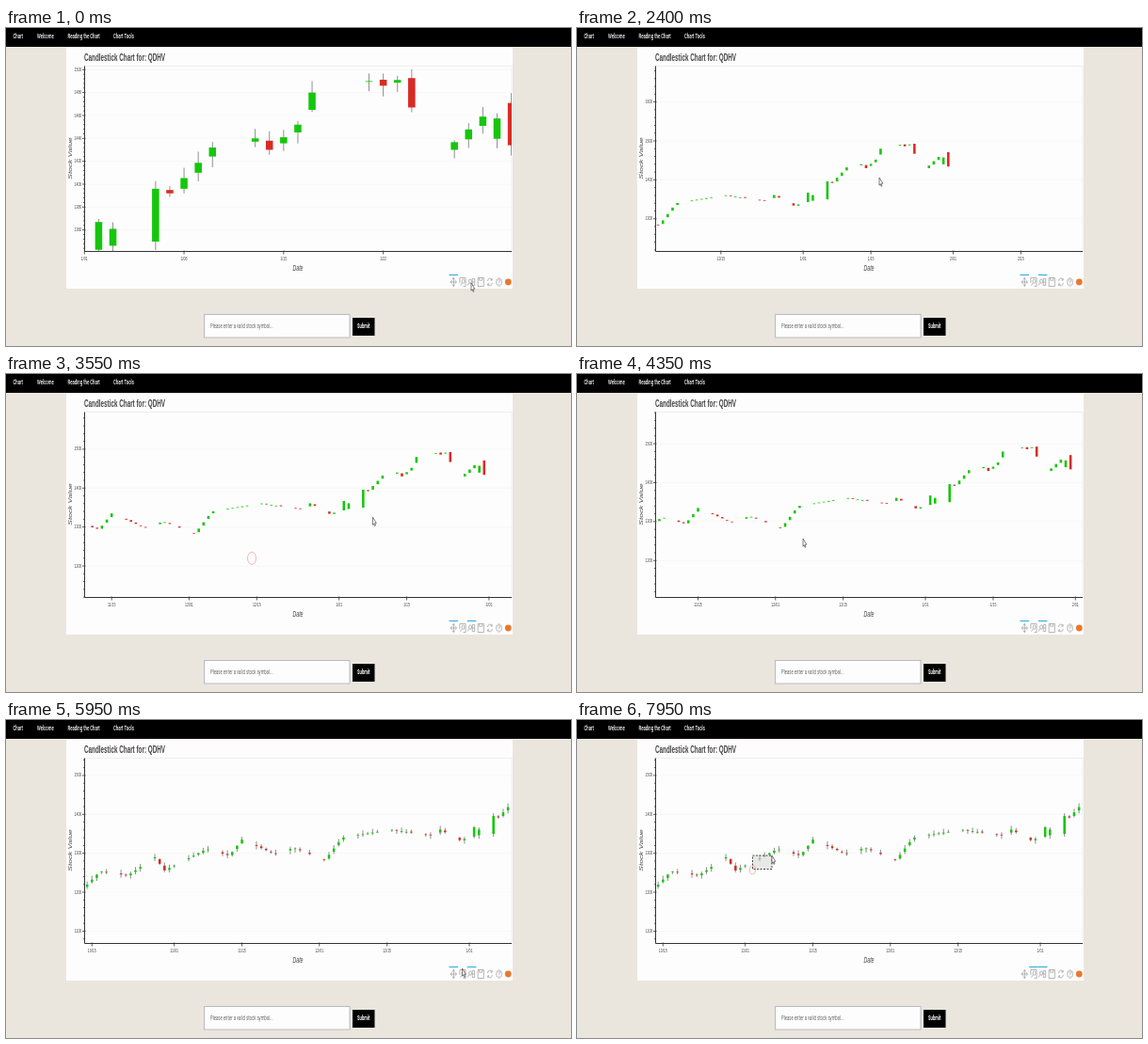
An HTML page with a canvas that plays this animation: 600x338 px, repeating every 8 s.

```html
<!DOCTYPE html>
<html lang="en">
<head>
<meta charset="utf-8">
<title>Candlestick chart</title>
<style>
  html, body { margin: 0; width: 100%; height: 100%; overflow: hidden; background: #eae6dd; }
  canvas { display: block; }
</style>
</head>
<body>
<canvas id="stage" width="600" height="338"></canvas>
<script>
const ctx = document.getElementById('stage').getContext('2d');
const LOOP = 8000;
const SQUEEZE = 0.62; // the page is shown narrower than it was laid out
const PLOT = { left: 83.5, top: 40.5, right: 537, bottom: 237.5 };
const SANS = '"Liberation Sans", Arial, sans-serif';
const UI = 'Roboto, sans-serif';
const GREEN = '#16c60c', RED = '#d92b25', INK = '#444', PAPER = '#fefdfe', ACTIVE = '#26aae1';

// Turning points of the price: [day, price], where day 0 is 1 January
const TREND = [
  [-79.3, 1212], [-76, 1254], [-70.3, 1243], [-64.7, 1290], [-62.7, 1256], [-54, 1311],
  [-49.3, 1294], [-46.7, 1335], [-40, 1299], [-36, 1314], [-29.5, 1283], [-26, 1340],
  [-16, 1361], [-7, 1345], [-5.7, 1361], [-1.7, 1334], [0.7, 1341], [1.3, 1367],
  [1.7, 1348], [2.3, 1361], [4.7, 1350], [5.3, 1396], [6.3, 1392], [9.3, 1432],
  [12.3, 1440], [13.3, 1430], [15.3, 1452], [16.3, 1480], [20.7, 1491], [21.3, 1486],
  [22.7, 1493], [23.3, 1467], [25.7, 1430], [28.3, 1459], [28.7, 1440], [29.7, 1469], [30.3, 1434]
];
const HOLIDAYS = [-34, -7, 0, 19];

const clamp01 = v => Math.min(1, Math.max(0, v));
const lerp = (a, b, p) => a + (b - a) * p;
const random = n => { const s = Math.sin(n * 12.9898) * 43758.5453; return s - Math.floor(s); };
const dateOf = day => new Date(Date.UTC(2020, 0, 1 + day));

function priceAt(day) {
  const i = Math.max(1, TREND.findIndex(point => point[0] >= day));
  const [[d1, p1], [d2, p2]] = [TREND[i - 1], TREND[i]];
  return lerp(p1, p2, (day - d1) / (d2 - d1));
}

// Each body spans one session of the trend, leaving a gap overnight
const candles = [];
for (let day = -79; day <= 30; day++) {
  if (dateOf(day).getUTCDay() % 6 === 0 || HOLIDAYS.includes(day)) continue;
  const open = priceAt(day - 0.3) + 4 * (random(day) - 0.5), close = priceAt(day + 0.3);
  candles.push({
    day, open, close,
    high: Math.max(open, close) + 1 + 9 * random(day + 200),
    low: Math.min(open, close) - 1 - 9 * random(day + 300)
  });
}

// Moves: [start, end, x, y]
const POINTER_START = [494, 271];
const POINTER_MOVES = [
  [1000, 1150, 321, 159], [2500, 3000, 261, 195], [3280, 3700, 408, 146], [4000, 4350, 240, 175],
  [4500, 4800, 349, 161], [5200, 5750, 484.5, 264], [6700, 7350, 186.5, 158.5], [7580, 7950, 207, 144]
];
// Where day 0 and price 1400 are dragged to
const PAN_MOVES = [[3280, 3700, 370, 115.5], [4500, 4850, 492, 100.3]];
const PRESSES = [400, 3280, 4500, 6200, 7550];
const ZOOM = { start: 1600, end: 2350, factor: 0.34, x: 321, y: 159 };
const WHEEL_ON = 450, WICKS_BACK = 5350, BOX_TOOL_ON = 6250, SELECT_FROM = 7550;

function follow(position, moves, t) {
  let [x, y] = position;
  for (const [start, end, toX, toY] of moves) {
    const eased = 1 - (1 - clamp01((t - start) / (end - start))) ** 2;
    x = lerp(x, toX, eased);
    y = lerp(y, toY, eased);
  }
  return [x, y];
}
const pointerAt = t => follow(POINTER_START, POINTER_MOVES, t);

function viewAt(t) {
  const zoom = ZOOM.factor ** clamp01((t - ZOOM.start) / (ZOOM.end - ZOOM.start));
  const zoomed = [lerp(ZOOM.x, 83.3, zoom), lerp(ZOOM.y, 166, zoom)];
  const [x0, y0] = follow(zoomed, PAN_MOVES, t);
  const perDay = 15.11 * zoom, perUnit = 1.217 * zoom;
  return { perDay, perUnit, x: day => x0 + day * perDay, y: price => y0 - (price - 1400) * perUnit };
}

function text(str, x, y, font, color, align = 'left', angle = 0) {
  ctx.save();
  ctx.translate(x, y);
  ctx.scale(SQUEEZE, 1);
  ctx.rotate(angle);
  ctx.font = font;
  ctx.fillStyle = color;
  ctx.textAlign = align;
  ctx.textBaseline = 'middle';
  ctx.fillText(str, 0, 0);
  ctx.restore();
}

function rect(x, y, w, h, color) {
  ctx.fillStyle = color;
  ctx.fillRect(x, y, w, h);
}

function line(x1, y1, x2, y2, color = '#333', width = 0.8) {
  ctx.strokeStyle = color;
  ctx.lineWidth = width;
  ctx.beginPath();
  ctx.moveTo(x1, y1);
  ctx.lineTo(x2, y2);
  ctx.stroke();
}

function drawPage() {
  rect(0, 0, 600, 338, '#eae6dd');
  rect(0, 0, 600, 20, '#000');
  [['Chart', 7.5], ['Welcome', 33], ['Reading the Chart', 65.5], ['Chart Tools', 114]]
    .forEach(([label, x]) => text(label, x, 9, `500 6.9px ${UI}`, '#fff'));
  rect(64, 21, 474, 256, PAPER);
  text('Candlestick Chart for: QDHV', 83, 32, `bold 10.2px ${SANS}`, INK);
  text('Date', 310, 255.5, `italic 8.4px ${SANS}`, INK, 'center');
  text('Stock Value', 69, 138.5, `italic 8.4px ${SANS}`, INK, 'center', -Math.PI / 2);

  rect(210, 304, 155.5, 25.5, '#b8bbc4');
  rect(211, 305, 153.5, 23.5, PAPER);
  text('Please enter a valid stock symbol...', 217, 317.2, `6.9px ${UI}`, '#666');
  rect(368, 308, 23.5, 19, '#000');
  text('Submit', 379.7, 317.5, `bold 6.7px ${UI}`, '#fff', 'center');
}

function drawAxes(view) {
  const { left, top, right, bottom } = PLOT;
  const label = `5.7px ${SANS}`;
  const span = (bottom - top) / view.perUnit;
  const step = [10, 20, 50, 100].reduce((a, b) => Math.abs(span / b - 6) < Math.abs(span / a - 6) ? b : a);
  const monthDays = view.perDay > 9 ? [1, 8, 15, 22] : [1, 15];

  ctx.strokeStyle = '#ececec';
  ctx.lineWidth = 0.8;
  ctx.strokeRect(left, top, right - left, bottom - top);
  for (let i = Math.ceil(1000 / step * 5); i <= 1800 / step * 5; i++) {
    const price = i * step / 5, y = view.y(price);
    if (y < top || y > bottom) continue;
    if (i % 5) { line(82, y, left, y); continue; }
    line(left, y, right, y, '#f7f7f7');
    line(81, y, 84.5, y);
    text(price, 80.3, y, label, INK, 'right');
  }
  for (let day = -90; day < 60; day++) {
    const date = dateOf(day), x = view.x(day), dayOfMonth = date.getUTCDate();
    if (x < left - 0.5 || x > right || !monthDays.includes(dayOfMonth)) continue;
    line(x, bottom - 1, x, bottom + 3);
    text(`${date.getUTCMonth() + 1}/${String(dayOfMonth).padStart(2, '0')}`, x, 245.5, label, INK, 'center');
  }
  line(left, top, left, bottom, '#333', 1);
  line(left, bottom, right, bottom, '#333', 1);
}

function drawCandles(view, wicks) {
  ctx.save();
  ctx.beginPath();
  ctx.rect(PLOT.left, PLOT.top, PLOT.right - PLOT.left, PLOT.bottom - PLOT.top);
  ctx.clip();
  const width = view.perDay / 2;
  for (const { day, open, close, high, low } of candles) {
    const x = view.x(day), top = view.y(Math.max(open, close));
    if (wicks) line(x, view.y(high), x, view.y(low), '#555', 0.65);
    const height = Math.max(0.8, Math.abs(close - open) * view.perUnit);
    rect(x - width / 2, top, width, height, close > open ? GREEN : RED);
  }
  ctx.restore();
}

const magnifier = (x, y) => `M${x + 2.4} ${y}a2.4 2.4 0 1 0 -4.8 0a2.4 2.4 0 1 0 4.8 0M${x - 2} ${y + 2}l-3 3`;
const ICONS = [
  'M-5 0H5M0-5V5M-5 0l2-2M-5 0l2 2M5 0l-2-2M5 0l-2 2M0-5l-2 2M0-5l2 2M0 5l-2-2M0 5l2-2',
  'M-5-5H5V5H1M-5-5V1' + magnifier(1, -1),
  'M1 4V-4H5V4H1M1 0H5' + magnifier(-2.5, -1),
  'M-5-5H5V5H-5ZM-2.5-5V-2H2.5V-5',
  'M-4-1A4 4 0 0 1 3.5-2.2M4 1A4 4 0 0 1-3.5 2.2M3.5-4.5V-2H1M-3.5 4.5V2H-1',
  'M4.5 0A4.5 4.5 0 1 0-4.5 0A4.5 4.5 0 1 0 4.5 0M-1.5-1.5C-1.5-4 2-3.5 1.5-1.2L0 .5V1.2M0 2.4V3.4'
].map(d => new Path2D(d));
const iconX = i => 475.3 + i * 9.65;

function drawToolbar(t) {
  ICONS.forEach((icon, i) => {
    ctx.save();
    ctx.translate(iconX(i), 270);
    ctx.scale(SQUEEZE, 0.9);
    ctx.strokeStyle = '#989898';
    ctx.lineWidth = 0.9;
    ctx.stroke(icon);
    ctx.restore();
  });
  ctx.fillStyle = '#e8792f';
  ctx.beginPath();
  ctx.arc(533.3, 270, 3.4, 0, 7);
  ctx.fill();

  const active = [t < BOX_TOOL_ON ? 0 : 1];
  if (t >= WHEEL_ON) active.push(2);
  active.forEach(i => rect(iconX(i) - 4.85, 262, 9.7, 1, ACTIVE));
}

function drawSelection(x, y) {
  const [startX, startY] = pointerAt(SELECT_FROM);
  ctx.save();
  ctx.globalAlpha = 0.5;
  rect(startX, startY, x - startX, y - startY, 'lightgrey');
  ctx.globalAlpha = 1;
  ctx.strokeStyle = '#333';
  ctx.lineWidth = 0.9;
  ctx.setLineDash([2, 1.5]);
  ctx.strokeRect(startX, startY, x - startX, y - startY);
  ctx.restore();
}

function drawPressRing(t) {
  const start = PRESSES.find(press => t >= press && t <= press + 500);
  if (start === undefined) return;
  const [x, y] = pointerAt(start);
  const radius = 7.3 - 0.0105 * (t - start);
  ctx.strokeStyle = 'rgba(226, 110, 105, 0.55)';
  ctx.lineWidth = 0.9;
  ctx.beginPath();
  ctx.ellipse(x, y + 0.8, radius, radius * 1.48, 0, 0, 7);
  ctx.stroke();
}

const ARROW = new Path2D('M0 0V8.2L1.2 6.8L2.1 9.4L3 8.8L2.2 6.3H3.8Z');
function drawPointer(x, y) {
  ctx.save();
  ctx.translate(x, y);
  ctx.fillStyle = '#fff';
  ctx.strokeStyle = '#4a4a4a';
  ctx.lineWidth = 0.7;
  ctx.fill(ARROW);
  ctx.stroke(ARROW);
  ctx.restore();
}

function draw(t) {
  const view = viewAt(t);
  const [x, y] = pointerAt(t);
  drawPage();
  drawAxes(view);
  drawCandles(view, t < ZOOM.start || t >= WICKS_BACK);
  drawToolbar(t);
  if (t > SELECT_FROM) drawSelection(x, y);
  drawPressRing(t);
  drawPointer(x, y);
}

const begin = performance.now();
function frame() {
  draw((performance.now() - begin) % LOOP);
  requestAnimationFrame(frame);
}
frame();
</script>
</body>
</html>
```
